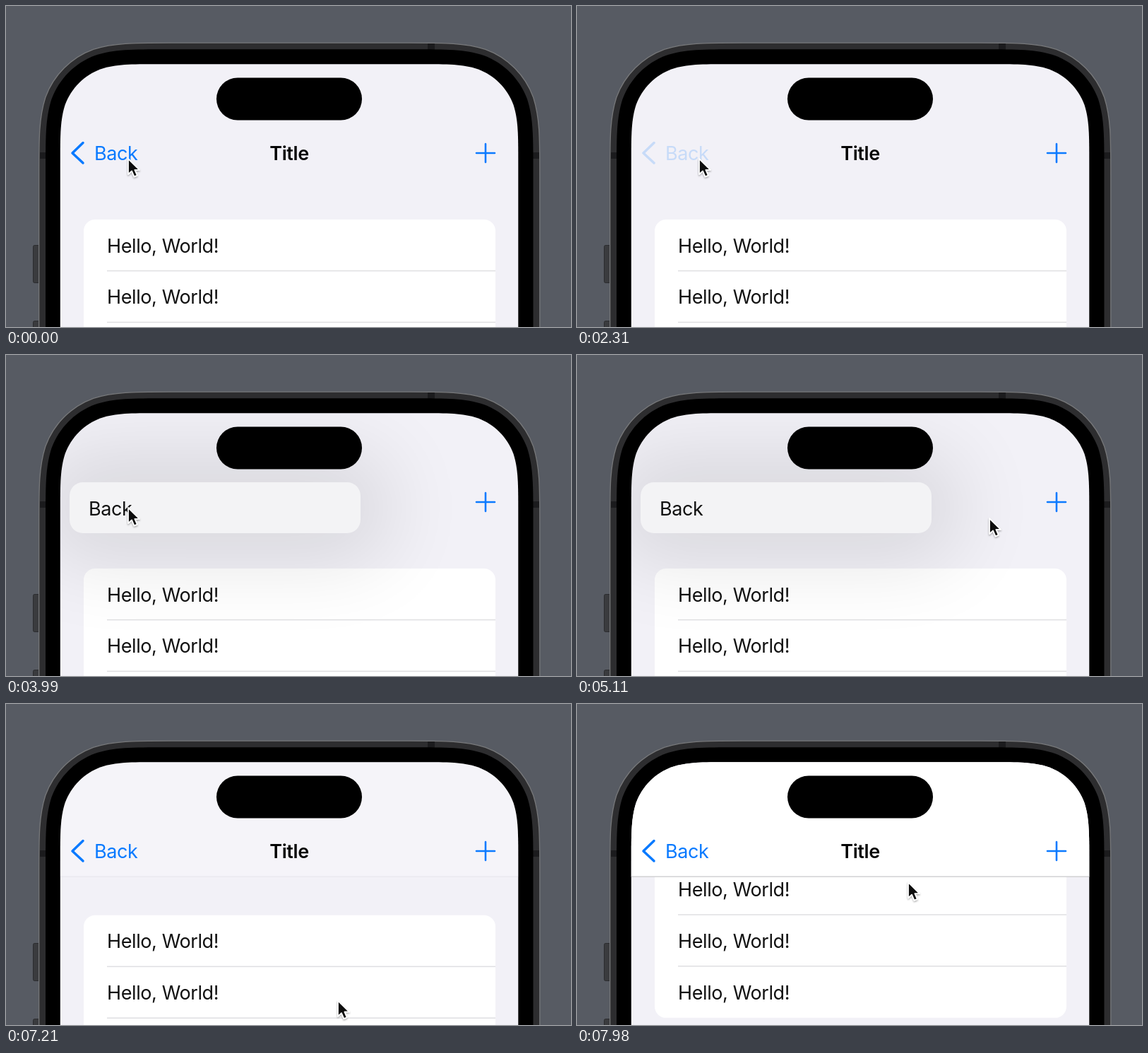
These frames come from a looping animation (800x454 px, 8000 ms). An HTML page:

```html
<!DOCTYPE html>
<html lang="en">
<head>
<meta charset="utf-8">
<title>Back button menu</title>
<style>
  html, body { margin: 0; width: 100%; height: 100%; overflow: hidden; background: #575b63; }
  svg { display: block; width: 100vw; height: 100vh; }
  text { font: 400 27px Inter, "Liberation Sans", sans-serif; letter-spacing: -.4px; fill: #111; }
  .bold { font-weight: 600; fill: #050505; }
  .blue { fill: #0a7aff; }
  .line { fill: none; stroke: #0a7aff; stroke-linecap: round; stroke-linejoin: round; }
</style>
</head>
<body>
<svg viewBox="0 0 800 454" preserveAspectRatio="none">
  <defs>
    <clipPath id="screenClip"><path id="screenEdge"/></clipPath>
    <filter id="soft" x="-100%" y="-250%" width="300%" height="600%">
      <feGaussianBlur stdDeviation="58"/>
    </filter>
    <filter id="drop" x="-50%" y="-50%" width="200%" height="200%">
      <feDropShadow dx="0" dy="1.5" stdDeviation="1.3" flood-opacity=".35"/>
    </filter>
  </defs>
  <rect width="800" height="454" fill="#575b63"/>

  <g fill="#3a3b3e" stroke="#2b2c2f">
    <rect x="38.5" y="338.5" width="10" height="53" rx="2"/>
    <rect x="38.5" y="445.5" width="10" height="60" rx="2"/>
  </g>
  <path id="body" fill="#2d2d2f" stroke="#77787a" stroke-width="1.3"/>
  <g fill="#1b1b1d">
    <rect x="597" y="53" width="10" height="10"/>
    <rect x="48" y="207" width="10" height="9"/>
    <rect x="745" y="207" width="10" height="9"/>
  </g>
  <path id="bezel" fill="#000"/>

  <g clip-path="url(#screenClip)">
    <rect x="70" y="80" width="660" height="380" fill="#f2f1f7"/>
    <g id="list"><rect x="110" y="302" width="583" height="218.4" rx="16" fill="#fff"/></g>
    <g id="bar">
      <rect x="70" y="80" width="660" height="164" fill="#fff"/>
      <rect x="70" y="243.5" width="660" height="1.3" fill="#cbcbce"/>
    </g>
    <g id="back">
      <path class="line" d="M109 193.5 L94 208 L109 222" stroke-width="3.5"/>
      <text class="blue" x="125" y="217.5">Back</text>
    </g>
    <text class="bold" x="401" y="217.5" text-anchor="middle">Title</text>
    <rect id="shade" x="50" y="140" width="492" height="152" rx="50" filter="url(#soft)"/>
    <path class="line" d="M666 208 H692 M679 195 V221" stroke-width="2.6"/>
    <g id="menu">
      <rect x="90" y="180" width="412" height="72" rx="19" fill="#f3f3f5"/>
      <rect id="press" x="90" y="180" width="412" height="72" rx="19" fill="#dedee0"/>
      <text x="117" y="226.5">Back</text>
    </g>
  </g>
  <rect x="298" y="101.5" width="206" height="60" rx="30"/>

  <path id="cursor" filter="url(#drop)" fill="#0c0c0c" stroke="#fff" stroke-width="1.8" stroke-linejoin="round"
        d="M0 0 V22 L5 17.4 L8.5 25.4 L12.8 23.6 L9.4 15.8 H16 Z"/>
</svg>
<script>
const LOOP = 8000, ROW = 72.8;
const $ = id => document.getElementById(id);
const clamp = v => Math.max(0, Math.min(1, v));
const smooth = u => u * u * (3 - 2 * u);
const phase = (t, a, b) => clamp((t - a) / (b - a));
const ease = (t, a, b) => smooth(phase(t, a, b));
const settle = u => 1 - (1 - u) ** 3;

// Continuous-curvature rounded rectangle that runs off the bottom of the stage.
function phonePath(left, top, right, r) {
  const corner = (x, dir) => (a, b) => `${x + dir * a * r} ${top + b * r}`;
  const l = corner(left, 1), g = corner(right, -1);
  return `M${left} 520 L${l(0, 1.529)}
    C${l(0, 1.088)} ${l(0, .868)} ${l(.075, .631)}
    C${l(.169, .373)} ${l(.373, .169)} ${l(.631, .075)}
    C${l(.868, 0)} ${l(1.088, 0)} ${l(1.529, 0)}
    L${g(1.529, 0)}
    C${g(1.088, 0)} ${g(.868, 0)} ${g(.631, .075)}
    C${g(.373, .169)} ${g(.169, .373)} ${g(.075, .631)}
    C${g(0, .868)} ${g(0, 1.088)} ${g(0, 1.529)}
    L${right} 520 Z`;
}

$("body").setAttribute("d", phonePath(46.7, 52.2, 755.8, 122));
$("bezel").setAttribute("d", phonePath(56, 61.3, 746.5, 112));
$("screenEdge").setAttribute("d", phonePath(76.8, 82.3, 725.3, 91));

for (let i = 0; i < 3; i++) {
  const y = 302 + i * ROW;
  const rule = i ? `<rect x="143" y="${y - 1}" width="550" height="1.5" fill="#dfdfe2"/>` : "";
  $("list").insertAdjacentHTML("beforeend", `${rule}<text x="143" y="${y + 46.5}">Hello, World!</text>`);
}

// Cursor moves: start, end, x, y
const START = [173, 216];
const DRAG_Y = 427;
const moves = [
  [4450, 4830, 584, 231],
  [5740, 6020, 663, 208],
  [6170, 6860, 470, DRAG_Y],
  [7100, 8000, 469, 252]
];

function cursorAt(t) {
  let [x, y] = START;
  for (const [a, b, tx, ty] of moves) {
    const u = ease(t, a, b);
    x += (tx - x) * u;
    y += (ty - y) * u;
  }
  return [x, y];
}

function draw(t) {
  const [x, y] = cursorAt(t);
  $("cursor").setAttribute("transform", `translate(${x} ${y})`);

  // Dragging past the end of a short list moves it by less than the pointer.
  const scroll = t > 7000 ? (DRAG_Y - y) * .438 : 0;
  $("list").setAttribute("transform", `translate(0 ${-scroll})`);
  $("bar").setAttribute("opacity", clamp(scroll / 14));

  const open = settle(phase(t, 2560, 2870)) * (1 - ease(t, 5180, 5480));
  const size = .15 + .85 * open;
  $("menu").setAttribute("transform", `translate(100 208) scale(${size}) translate(-100 -208)`);
  $("menu").setAttribute("opacity", clamp(open * 2));
  $("shade").setAttribute("opacity", open * .105);
  $("press").setAttribute("opacity", ease(t, 2870, 3010) * (1 - ease(t, 3340, 3500)));
  $("back").setAttribute("opacity", 1 - .82 * ease(t, 2090, 2240) * (1 - ease(t, 5250, 5550)));
}

const begin = performance.now();
function frame() {
  draw((performance.now() - begin) % LOOP);
  requestAnimationFrame(frame);
}
frame();
</script>
</body>
</html>
```
